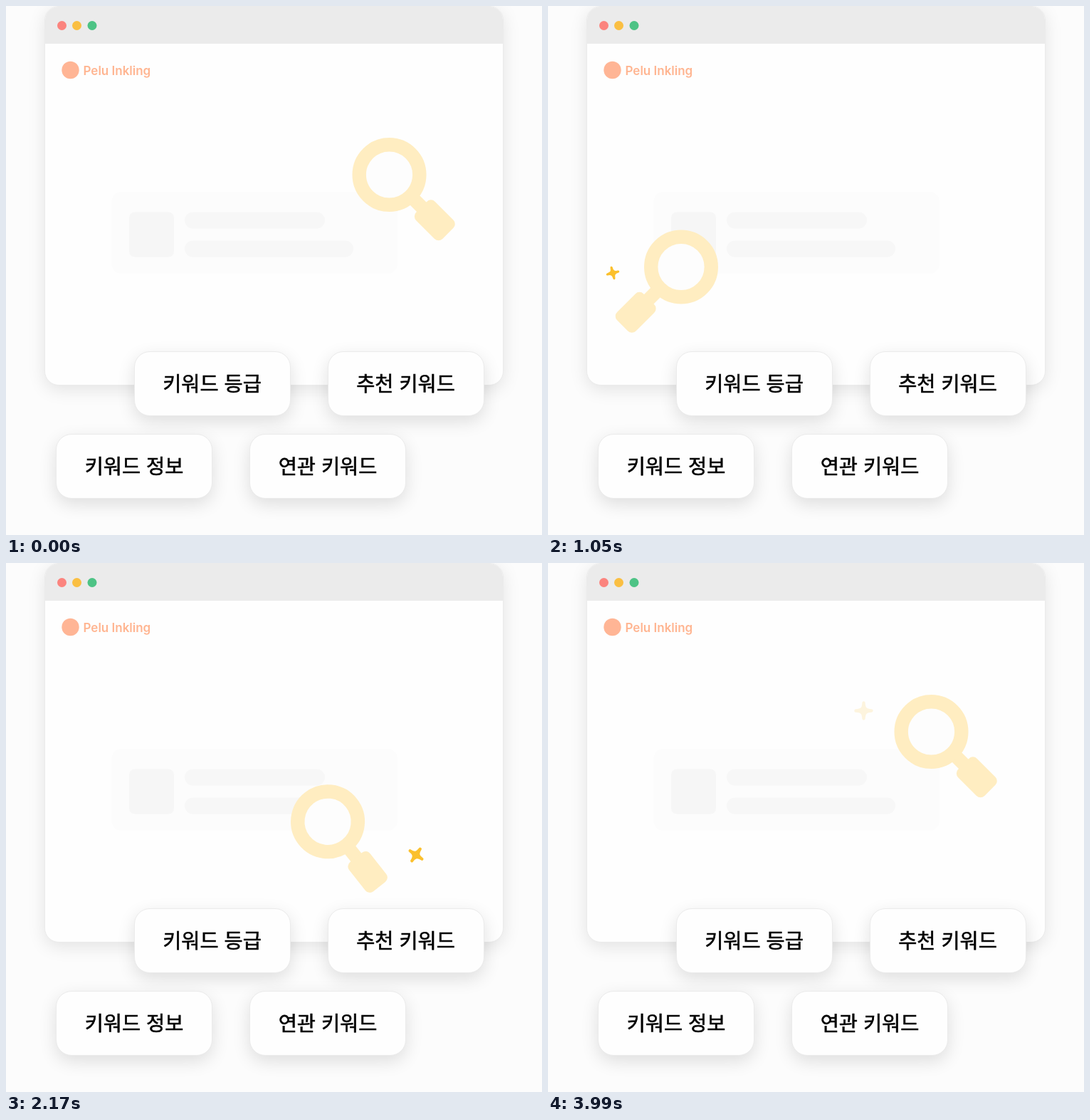
An HTML page that plays this animation: 753 by 743 pixels, repeating every 4060 ms.

```html
<!DOCTYPE html>
<html lang="ko">
<head>
<meta charset="utf-8">
<title>Keyword search</title>
<style>
  html, body { margin: 0; width: 100%; height: 100%; overflow: hidden; background: #fcfcfc; }
  .window, .pill, svg { position: absolute; box-sizing: border-box; }
  .window, .pill { background: #fefefe; border: 1.5px solid #ebebeb; }
  .window {
    left: 54px; top: 0; width: 645px; height: 533px; border-radius: 20px;
    overflow: hidden; box-shadow: 0 6px 24px rgba(0, 0, 0, .1);
  }
  .bar { height: 52px; background: #ebebeb; }
  svg { left: 0; top: 0; }
  .brand { font: 600 17px Inter, sans-serif; fill: #ffb591; }
  .pill {
    width: 220px; height: 91px; border-radius: 22px; text-align: center;
    font: 500 28.4px/86px "Noto Sans CJK KR", "Noto Sans CJK", sans-serif; color: #000;
    -webkit-text-stroke: .6px #000;
    white-space: nowrap; box-shadow: 0 8px 24px rgba(0, 0, 0, .12);
  }
</style>
</head>
<body>
<div class="window"><div class="bar"></div></div>

<svg width="753" height="743" viewBox="0 0 753 743">
  <defs>
    <clipPath id="listArea"><rect x="140" y="206" width="420" height="212"/></clipPath>
    <g id="card">
      <rect x="148.5" y="261" width="401.5" height="115" rx="14" fill="#fcfcfc"/>
      <rect x="173" y="289.5" width="63" height="63" rx="8" fill="#f6f6f6"/>
      <g fill="#f7f7f7">
        <rect x="251" y="289.5" width="197" height="23" rx="11.5"/>
        <rect x="251" y="329.5" width="237" height="23" rx="11.5"/>
      </g>
    </g>
    <path id="star" fill="#fbc02d" stroke="#fbc02d" stroke-width="4.4" stroke-linejoin="round"
      d="M0-11C.4-2.8 2.8-.4 11 0C2.8 .4 .4 2.8 0 11C-.4 2.8-2.8 .4-11 0C-2.8-.4-.4-2.8 0-11Z"/>
  </defs>

  <circle cx="78.5" cy="27.5" r="6.5" fill="#fb847e"/>
  <circle cx="99.5" cy="27.5" r="6.5" fill="#fabf42"/>
  <circle cx="121" cy="27.5" r="6.5" fill="#4dc385"/>

  <circle cx="90.5" cy="90" r="12.2" fill="#ffb595"/>
  <text class="brand" x="108.5" y="97">Pelu Inkling</text>

  <g clip-path="url(#listArea)">
    <use id="leaving" href="#card"/>
    <use id="arriving" href="#card"/>
  </g>

  <g id="sparkles"></g>

  <g id="lens" fill="#ffedc1">
    <rect x="46" y="-9.5" width="24" height="19"/>
    <rect x="64" y="-18.7" width="52.5" height="37.4" rx="8"/>
    <circle r="42.3" fill="#fdfdfd" stroke="#ffedc1" stroke-width="19.4"/>
  </g>
</svg>

<script>
  const LOOP = 4060, STEP = 70, SCROLL = LOOP / 4;

  const pills = [
    ['키워드 등급', 179.5, 484.5],
    ['추천 키워드', 451.5, 484.5],
    ['키워드 정보', 70, 601],
    ['연관 키워드', 342, 601],
  ];

  // Stops of the magnifier: centre and handle angle; rise bends the path upwards
  const topRight = [538.5, 237, 45];
  const lowLeft = [187, 366.5, 135];
  const lowRight = [473, 363, 45];
  const moves = [
    { from: topRight, to: lowLeft, start: 230, rise: 10.5 },
    { from: lowLeft, to: lowRight, start: 1510, rise: 0 },
    { from: lowRight, to: topRight, start: 2746, rise: 0 },
  ];
  const MOVE_TIME = 791;

  const sparkles = [
    { x: 91, y: 375, start: 932, fade: 1460, end: 1705 },
    { x: 576, y: 410, start: 1976, fade: 2520, end: 2765 },
    { x: 443.5, y: 207.5, start: 3345, fade: 3780, end: 4027 },
  ];
  const GROW_TIME = 280;

  const byId = id => document.getElementById(id);
  const progress = (t, start, time) => Math.min(1, Math.max(0, (t - start) / time));
  const smooth = u => u * u * (3 - 2 * u);
  const cubic = u => u < .5 ? 4 * u ** 3 : 1 - 4 * (1 - u) ** 3;
  const place = (el, x, y, angle = 0, scale = 1) =>
    el.setAttribute('transform', `translate(${x} ${y}) rotate(${angle}) scale(${scale})`);

  for (const [label, x, y] of pills) {
    const pill = document.createElement('div');
    pill.className = 'pill';
    pill.textContent = label;
    pill.style.left = x + 'px';
    pill.style.top = y + 'px';
    document.body.append(pill);
  }

  for (const s of sparkles) {
    s.el = document.createElementNS('http://www.w3.org/2000/svg', 'use');
    s.el.setAttribute('href', '#star');
    byId('sparkles').append(s.el);
  }

  function drawList(t) {
    const local = t % SCROLL;
    place(byId('leaving'), 0, -170 * cubic(progress(local, 209, 620)));
    place(byId('arriving'), 0, 157 * (1 - cubic(progress(local, 211, 557))));
  }

  function drawLens(t) {
    const { from, to, start, rise } = moves.findLast(m => t >= m.start) || moves[0];
    const e = smooth(progress(t, start, MOVE_TIME));
    const [x, y, angle] = from.map((v, i) => v + (to[i] - v) * e);
    place(byId('lens'), x, y - rise * 4 * e * (1 - e), angle);
  }

  function drawSparkle(s, t) {
    const u = progress(t, s.start, GROW_TIME);
    place(s.el, s.x, s.y, -180 * (1 - u), 1 - (1 - u) ** 2.3);
    s.el.setAttribute('opacity', u ? 1 - progress(t, s.fade, s.end - s.fade) : 0);
  }

  function frame() {
    const t = Math.floor(performance.now() % LOOP / STEP) * STEP;
    drawList(t);
    drawLens(t);
    sparkles.forEach(s => drawSparkle(s, t));
    requestAnimationFrame(frame);
  }
  frame();
</script>
</body>
</html>
```
